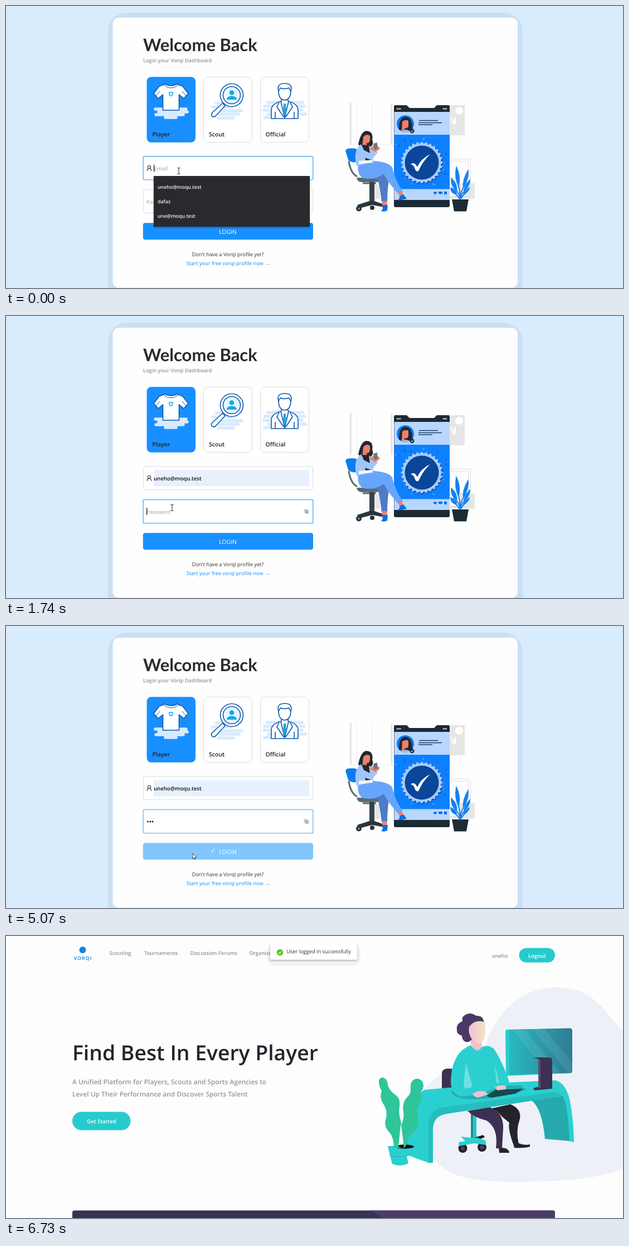
Write an HTML page that moves like this. It is 1107 px wide and 506 px high and loops after 8840 ms.

```html
<!DOCTYPE html>
<html lang="en">
<head>
<meta charset="utf-8">
<title>Login flow</title>
<style>
html, body { margin: 0; height: 100%; overflow: hidden; background: #fdfdfe; }
svg { display: block; width: 1107px; height: 506px; font-family: "Open Sans", "Noto Sans", sans-serif; text-rendering: geometricPrecision; }
.semi { font-weight: 600; }
.mid { text-anchor: middle; }
.bands { fill: none; stroke: #d8eaff; stroke-width: 5.5; stroke-linecap: round; }
.ink { fill: #fff; stroke: #0b57ad; stroke-width: 1.6; stroke-linejoin: round; }
.label { font-size: 10.5px; font-weight: 600; fill: #222; }
.box { fill: #fff; stroke: #dcdcdc; }
.focus { fill: none; stroke: #5db5ff; stroke-width: 1.2; }
.glow { fill: none; stroke: #1890ff; stroke-opacity: .2; stroke-width: 2; }
.hint { font-size: 9.3px; font-weight: 600; fill: #b4b4b4; }
.nav { font-size: 9.35px; fill: #938e98; }
.pill { fill: #27cbcd; }
.pilltext { font-size: 9.5px; fill: #fff; }
</style>
</head>
<body>
<svg viewBox="0 0 1107 506">
<defs>
  <linearGradient id="skin"><stop stop-color="#f1c3d2"/><stop offset="1" stop-color="#f3e3c4"/></linearGradient>
  <linearGradient id="glass"><stop stop-color="#28b9bd"/><stop offset="1" stop-color="#2f7993"/></linearGradient>
  <clipPath id="face"><circle cx="716.5" cy="211.5" r="15.5"/></clipPath>
  <clipPath id="screen"><path d="M903 168L1012 165.500Q1016 166 1016 170V243Q1016 246 1012 246L903 249Z"/></clipPath>
  <filter id="soft" x="-10%" y="-20%" width="120%" height="150%"><feDropShadow dx="0" dy="1.500" stdDeviation="1.500" flood-opacity=".35"/></filter>
</defs>

<g id="login">
  <rect width="1107" height="506" fill="#d9ecfe"/>
  <rect x="183" y="12" width="744" height="540" rx="34" fill="#cadff2"/>
  <rect x="191.500" y="21" width="726.500" height="484.500" rx="11" fill="#fefefe"/>
  <text x="246" y="81" font-size="31" font-weight="700" fill="#2a2b30" style="font-family:Lato,sans-serif">Welcome Back</text>
  <text x="246" y="100.500" font-size="9.200" class="semi" fill="#949199">Login your Vorqi Dashboard</text>

  <rect x="252.600" y="127.200" width="87.400" height="117.600" rx="8" fill="#188fff"/>
  <rect class="box" x="354.500" y="127.500" width="87" height="117" rx="8"/>
  <rect class="box" x="456.500" y="127.500" width="87" height="117" rx="8"/>
  <text class="label" x="262.500" y="234">Player</text>
  <text class="label" x="364" y="234">Scout</text>
  <text class="label" x="465.500" y="234">Official</text>

  <path class="bands" d="M268 185H323M274 190H325M269 195H318M286 200H305"/>
  <path class="ink" d="M285 140Q296 146 307 140L317 144L327 157L319 166L310.500 159V187H281.500V159L273 166L265 157L275 144Z"/>
  <path d="M283 142Q296 152 309 142M269 161L276 153M323 161L316 153" fill="none" stroke="#0b57ad"/>
  <path d="M293 155H299V158.500Q298 161 296 161.500Q294 161 293 158.500Z" fill="#dff6ff" stroke="#12a9e6" stroke-width="1.500"/>

  <path class="bands" d="M377 174H421M370 181H404M374 188H423M370 194H417M381 201H408"/>
  <g class="ink">
    <path d="M388.500 174.500L393 179L375.500 198Q372 200 369.500 197.500Q367.500 195 370 191.500Z"/>
    <circle cx="405" cy="160" r="20.500"/><circle cx="405" cy="160" r="15.500" fill="#e6f5ff"/>
  </g>
  <circle cx="405" cy="155.500" r="4.300" fill="#14a9e2"/>
  <path d="M396 168Q396 161.500 405 161.500Q414 161.500 414 168Z" fill="#14a9e2"/>

  <path class="bands" d="M469 173H532M464 180H535M463 187H531M471 194H538M464 200H480"/>
  <g class="ink">
    <path d="M476 202V186Q477 175 494 171V164H506V171Q523 175 524 186V202Z"/>
    <path d="M489 152Q489 168 500 169Q511 168 511 152V147H489Z"/>
    <path d="M489 153Q485 139 500 139Q515 139 511 153Q509 150 508 147Q498 150 492 147Z"/>
    <path d="M493 171L500 201L507 171M490 173L486 181L498 199M510 173L514 181L502 199M483 190V202M517 190V202" fill="none"/>
  </g>
  <path d="M498 175H502L503 190L500 197L497 190Z" fill="#14a9e2"/>

  <rect class="box" x="246.500" y="270.200" width="304" height="41.300" rx="2"/>
  <rect class="box" x="246.500" y="329.700" width="304" height="41.800" rx="2"/>
  <g id="emailFocus"><rect class="glow" x="245.500" y="269.200" width="306" height="43.300" rx="3"/><rect class="focus" x="246.500" y="270.200" width="304" height="41.300" rx="2"/></g>
  <g id="passFocus"><rect class="glow" x="245.500" y="328.700" width="306" height="43.800" rx="3"/><rect class="focus" x="246.500" y="329.700" width="304" height="41.800" rx="2"/></g>
  <rect id="filled" x="265" y="276.500" width="279" height="29" fill="#e8f0fe"/>
  <path d="M253.300 296Q253.300 291.500 257 291.500Q260.700 291.500 260.700 296" fill="none" stroke="#333" stroke-width="1.100"/>
  <circle cx="257" cy="288.800" r="2.600" fill="none" stroke="#333" stroke-width="1.100"/>
  <text id="emailHint" class="hint" x="265.500" y="294.500">Email</text>
  <text id="email" class="semi" x="265" y="294.500">uneho@moqu.test</text>
  <text id="passHint" class="hint" x="252" y="354.500">Password</text>
  <g id="dots" fill="#222"><circle cx="254.500" cy="351" r="1.500"/><circle cx="258.800" cy="351" r="1.500"/><circle cx="263" cy="351" r="1.500"/></g>
  <rect id="caret" width="1.200" height="13" fill="#111"/>
  <g fill="none" stroke="#888"><path d="M534.500 351Q539 344 543.500 351Q539 357.500 534.500 351Z"/><circle cx="539" cy="351" r="1.600"/><path d="M535.500 346.500L543 355"/></g>

  <rect id="button" x="245.800" y="389.300" width="305.200" height="30" rx="4"/>
  <path id="spinner" d="M6 0A6 6 0 0 1 0 6" fill="none" stroke="#fff"/>
  <text id="loginText" class="mid" y="408.500" font-size="10.600" font-weight="500" fill="#fff">LOGIN</text>
  <text class="mid" x="398" y="449" font-size="9.300" fill="#333">Don't have a Vorqi profile yet?</text>
  <text class="mid" x="398.500" y="465" font-size="9.300" fill="#1787f5">Start your free vorqi profile now →</text>

  <g id="art">
    <path d="M618.500 174V249M692 175V249" stroke="#e3e3e3" stroke-width="3"/>
    <path d="M629.500 174V249M657 174V249M617 249H694" stroke="#ececec"/>
    <path d="M796 178H823V232H796ZM807 318H841V346H796V341H807ZM660 320H671V346H660Z" fill="#e6e6e6"/>
    <path d="M797 274.500H833.500V341H797M797 278.500H829.500V337" fill="none" stroke="#dedede"/>
    <circle cx="813" cy="188" r="7" fill="#fff"/>
    <path d="M798 199L803 212L806 199V212" stroke="#fff" stroke-width="2" fill="none"/>
    <path d="M698 178H719L724 183H768L773 178H794Q796 178 796 181V358Q796 361 793 361H699Q696 361 696 358V181Q696 178 698 178Z" fill="#1c2a35"/>
    <path d="M696.500 190H796V348H696.500Z" fill="#b9d6ff"/>
    <rect x="696.500" y="231" width="99.500" height="97.500" fill="#0d80ff"/>
    <path d="M701 184.500H709M784 184.500H791" stroke="#fff" stroke-width="2" stroke-dasharray="2 .7"/>
    <path d="M741 205.500H775M740 209.500H782M740 213H765" stroke="#1c3c66" stroke-width="1.500"/>
    <g clip-path="url(#face)"><circle cx="716.500" cy="211.500" r="15.500" fill="#0877ea"/>
      <path d="M705 222Q705 201 715 199Q730 198 729 224Z" fill="#202833"/>
      <path d="M704 230Q708 222 715 222Q726 222 728 230Z" fill="#92bdf9"/>
      <path d="M711 207Q718 203 722 206V216Q719 221 715 219V224H710Z" fill="#ee8069"/></g>
    <circle cx="728.500" cy="224" r="4.200" fill="#172d45"/><path d="M726.500 224L728 226L731 222" stroke="#fff" fill="none"/>
    <g id="confetti" stroke-width="1.400"/>
    <path id="burstShade" fill="#0a479b" transform="translate(1 1.500)"/><path id="burst" fill="#a9cbfa"/>
    <circle cx="746" cy="281" r="30.500" fill="#0a469a"/>
    <path d="M726 284Q733 278 738 289Q744 274 761 266Q748 278 740 296Q736 298 734 293Q732 285 726 284Z" fill="#fff"/>
    <path d="M770 338.500L767 335.500Q767 332.500 770 333.500Q773 332.500 773 335.500ZM776 333H783V337H780L779 339V337H776ZM786 333H791V339L788.500 337L786 339Z" fill="#0b6be4"/>
    <path d="M800 347H830L826 368.500H804Z" fill="#1d2b34"/>
    <g id="leaves" fill="#1382f3"/>

    <path d="M610 263Q607 256 616 255.500Q631 254 632 261L636 279Q620 283 614 276Z" fill="#0b7cf2"/>
    <path d="M615 278Q618 300 630 306M640 318H664" fill="none" stroke="#596a73" stroke-width="3"/>
    <path d="M629 308H676V312Q672 316 662 316H637Q630 315 629 308Z" fill="#596a73"/>
    <path d="M652 316H661V354H652Z" fill="#35434c"/>
    <path d="M630 357L652 350H661L684 358V362L657 357L634 363Z" fill="#29363e"/>
    <circle cx="633" cy="363.500" r="5" fill="#26323a"/><circle cx="633" cy="363.500" r="2" fill="#788790"/><circle cx="657" cy="362" r="4" fill="#26323a"/>
    <path d="M655 292L690 296Q684 322 684 352H674Q671 325 667 311L645 309Z" fill="#4f7cc4"/>
    <path d="M632 283L660 278Q688 280 693 290Q698 312 712 333L704 337Q684 315 678 301Q661 313 641 309Q629 303 632 283Z" fill="#67a5fc"/>
    <path d="M674 350H683L684 360H676ZM703 335L710 332L714 342L707 343Z" fill="#ee8069"/>
    <path d="M673 357L685 357L684 367Q679 370 673 368Q679 363 673 357ZM706 341L713 338L719 346L704 349Q702 348 706 345Z" fill="#0b70e4"/>
    <path d="M632 248Q637 224 647 224Q660 225 657 240Q661 249 653 253Q640 259 632 248Z" fill="#20282f"/>
    <path d="M641 235Q647 228 653 233Q654 241 651 245Q648 247 647 245L648 253H639Z" fill="#ee8069"/>
    <path d="M638 249L653 250L657 281H635Z" fill="#20282f"/>
    <path d="M637 248Q645 260 645 283L629 287Q622 259 637 248ZM651 250Q659 256 659 281L655 282ZM635 255L653 264L661 257L667 263L656 276Q642 273 632 265Z" fill="#a1c6fa"/>
    <path d="M633 278L657 276V281L633 284Z" fill="#f8f8f8"/>
    <path d="M653 257Q655 250 663 250L671 254Q669 260 662 262Z" fill="#ee8069"/>
    <path d="M659 247L666 245L667 256L661 258Z" fill="#697681"/>
  </g>

  <g id="popup">
    <rect x="265" y="305" width="280" height="91" fill="#292a2d" filter="url(#soft)"/>
    <rect id="hover" x="265" y="311" width="280" height="26" fill="#404145"/>
    <g font-size="8.800" class="semi" fill="#f4f4f4">
      <text x="272" y="327.500">uneho@moqu.test</text><text x="272" y="353.500">dafas</text><text x="272" y="380">une@moqu.test</text>
    </g>
  </g>
</g>

<g id="home">
  <rect width="1107" height="506" fill="#fdfdfe"/>
  <circle cx="137.500" cy="25" r="6" fill="#1683e2"/>
  <text class="mid semi" x="138" y="43" font-size="9" letter-spacing="1" fill="#1683e2">VORQI</text>
  <g class="nav semi">
    <text x="185.500" y="33.500">Scouting</text><text x="248" y="33.500">Tournaments</text>
    <text x="330.500" y="33.500">Discussion Forums</text><text x="436.500" y="33.500">Organizer</text>
    <text id="account" y="38.500"/>
  </g>
  <rect id="signPill" class="pill" y="21.500" height="26" rx="13"/>
  <text id="signText" class="mid semi pilltext" y="38.500"/>
  <text x="119" y="223" font-size="37.300" class="semi" fill="#25232b">Find Best In Every Player</text>
  <g font-size="11.900" class="semi" fill="#98929e">
    <text x="119" y="266">A Unified Platform for Players, Scouts and Sports Agencies to</text>
    <text x="119" y="288">Level Up Their Performance and Discover Sports Talent</text>
  </g>
  <rect class="pill" x="119" y="315.500" width="104.500" height="33" rx="16.500"/>
  <text class="mid semi pilltext" x="171.500" y="336">Get Started</text>

  <path d="M1107 168C1078 150 1064 92 988 92C928 92 884 132 862 190C846 230 790 232 757 268C720 305 730 355 765 398C790 425 815 441 910 441C1000 441 1060 436 1107 418Z" fill="#eef0f8"/>
  <path d="M782 246Q783 238 792 238H800V278H782Z" fill="#3b3152"/>
  <path d="M834 312H844V364H834Z" fill="#27c6c8"/><path d="M834 318H838V362H834Z" fill="#1b8f93"/>
  <path d="M840 362L856 357L859 361L846 366Z" fill="#17171b"/>
  <circle cx="819.500" cy="381" r="8" fill="#222128"/><circle cx="854" cy="379" r="8" fill="#222128"/>
  <circle cx="819.500" cy="381" r="3.500" fill="#4a3f62"/><circle cx="854" cy="379" r="3.500" fill="#4a3f62"/>
  <path d="M816 360L834 362H846L861 367V375L840 372L813 377L812 370L824 368Z" fill="#2ad0d0"/>
  <path d="M868 310L905 302Q925 310 922 328Q914 350 920 373L911 376Q900 346 903 335Q890 325 880 314ZM884 379L897 381Q903 385 903 389H885ZM911 376L920 372Q930 376 940 374V378Q930 381 912 380Z" fill="#24232a"/>
  <path d="M828 314L868 307Q893 317 892 345L890 381H879Q884 345 862 331Q840 326 828 314Z" fill="#3c3153"/>
  <path d="M943 295L1000 287Q1011 315 1013 368L967 364Q962 310 943 295Z" fill="#24a9ac"/>
  <path d="M712 388Q716 325 728 300Q738 282 751 276L897 263L985 259Q1003 262 1011 292Q1018 325 1019 370L1011 368Q1008 305 1000 287L790 319Q767 323 766 345V407H758L712 390Z" fill="#2ad0d0"/>
  <path d="M758 407V338Q758 312 785 307L985 280L1000 287L790 319Q767 323 766 345V407Z" fill="#25bdbf"/>
  <path d="M797 279L842 270L924 268L934 276Q885 292 838 293Q806 293 797 279Z" fill="#24aeb0"/>

  <path d="M896 171Q896 168 900 168L1012 165.500Q1016 166 1016 170V242Q1016 246 1012 246L897 251Z" fill="#29cccf"/>
  <g clip-path="url(#screen)"><path d="M903 160H1020V252H903Z" fill="url(#glass)"/>
    <path d="M913 160L988 252M950 160L1025 252" stroke="#fff" stroke-opacity=".08" stroke-width="17"/></g>
  <path d="M946 218H975Q980 218 980 225V274L948 277L946 273L957 270V224Q956 220 946 218Z" fill="#3c3153"/>
  <path d="M957 222V273" stroke="#594d70" stroke-width="4"/>

  <path d="M834 194L833 177L853 182L854 205Q846 212 838 203Z" fill="#efc1cd"/>
  <path d="M834 196Q846 213 854 199Q866 194 876 203Q892 228 903 262L883 271Q850 286 820 288Q798 286 798 260Q800 208 834 196Z" fill="#2bcfd0"/>
  <path d="M825 227L837 270Q826 277 821 270ZM877 231L885 263L880 264Z" fill="#70dfdf"/>
  <path d="M862 287L878 276L928 274L914 283L870 290Z" fill="#17474e"/>
  <path d="M837 284Q845 276 860 279L865 284L850 289Q842 291 837 284ZM877 272Q885 266 897 269L897 275L882 277Z" fill="#f0c2d1"/>
  <path d="M831 160Q838 149 859 152Q862 178 856 187Q850 195 843 190Q831 185 831 160Z" fill="url(#skin)"/>
  <path d="M857 154Q857 143 843 143Q834 136 825 141Q817 144 819 153Q807 158 809 168Q808 176 818 179Q819 192 830 190L836 186Q829 174 831 163Q841 149 857 154Z" fill="#4a3964"/>

  <path d="M685 377L727 375L725 393L719 395L722 408Q707 415 693 409L689 394Z" fill="#2ad0d0"/>
  <path d="M688 394Q706 398 725 393" stroke="#22aeb1" fill="none"/>
  <ellipse cx="715" cy="378" rx="17" ry="3.700" fill="#111"/>
  <path d="M669 262Q669 253 677 254Q685 257 685 268Q690 280 700 286Q708 292 706 306Q704 320 708 330L714 380H696Q696 360 686 350Q677 340 682 326Q685 312 676 300Q670 290 674 278Q669 270 669 262ZM749 268Q748 257 738 256Q725 257 726 272Q727 283 719 290Q710 300 713 316Q715 330 708 340L704 378L714 381Q722 372 722 362Q730 352 738 345Q742 335 738 322Q736 310 744 298Q750 290 744 280Q749 275 749 268Z" fill="#2ec59b"/>
  <path d="M119 506V496.500Q119 492.500 123 492.500H981Q985 492.500 985 496.500V506Z" fill="#3b3152"/>
  <path d="M652 492.500H981Q985 492.500 985 496.500V506H674Q666 497 652 492.500Z" fill="#4a3c66"/>

  <g id="toast">
    <rect x="468" y="14" width="168" height="40" rx="15" fill="#000" fill-opacity=".045"/>
    <rect x="474" y="12" width="156" height="30.500" rx="2" fill="#fff" filter="url(#soft)"/>
    <circle cx="491.500" cy="29.500" r="5.700" fill="#52c41a"/><path d="M489 29.500L491 31.800L494.200 27.500" fill="none" stroke="#fff" stroke-width="1.200"/>
    <text x="503" y="31" font-size="9.300" fill="#333">User logged in successfully</text>
  </g>
</g>

<g id="beam"><path d="M-2.500 -5.500H-.7L0 -5L.7 -5.500H2.500M0 -5V5M-2.500 5.500H-.7L0 5L.7 5.500H2.500" fill="none" stroke="#222"/></g>
<path id="hand" d="M-2 -5Q-2 -6.500 -.8 -6.500Q.4 -6.500 .4 -5V-1L4 0Q5 .5 5 2L4 6.500H-1.500L-5 1.500Q-5 0 -3.500 .3L-2 1.500Z" fill="#fff" stroke="#222" stroke-width=".9"/>
<path id="arrow" d="M0 0V9.500L2.200 7.600L3.700 11L5 10.400L3.500 7.200H6.500Z" fill="#fff" stroke="#222" stroke-width=".8"/>
</svg>

<script>
const LOOP = 8840;
const ticks = [0, 120, 270, 390, 660, 810, 960, 1100, 1220, 1340, 1460, 1610, 1740, 2010, 2140, 2400, 2940, 3190,
  3500, 3650, 3770, 4320, 4440, 4560, 4680, 4830, 4950, 5080, 5200, 5350, 5480, 5600, 5880, 6000, 6150, 6300, 6580, 6730];
const pointer = [
  [0, 310, 296, "beam"], [120, 310, 302, "beam"], [270, 308, 318, "arrow"], [390, 307, 321, "arrow"], [960, 304, 332, "beam"],
  [1100, 301, 337, "beam"], [1220, 299, 342, "beam"], [1340, 298, 344, "beam"], [4320, 304, 363, "beam"],
  [4440, 321, 396, "hand"], [4560, 332, 410, "hand"], [4680, 337, 414, "hand"], [4950, 335, 408, "arrow"],
  [5880, 440, 442, "arrow"], [6000, 613, 460, "arrow"], [6150, 680, 455, "arrow"], [6300, 853, 466, "arrow"],
  [6580, 988, 496, "arrow"], [6730, 0, 0, ""]];
const typed = [[0, 0], [2010, 1], [2400, 2], [3190, 1], [3650, 2], [3770, 3]];

const $ = id => document.getElementById(id);
const set = (id, attrs) => { for (const k in attrs) $(id).setAttribute(k, attrs[k]); };
const show = (id, on) => set(id, { visibility: on ? "visible" : "hidden" });
const ramp = (t, from, to) => Math.min(1, Math.max(0, (t - from) / (to - from)));
const last = (rows, t) => rows.filter(r => r[0] <= t).pop();
const random = n => { const v = Math.sin(n * 12.9898) * 43758.5453; return v - Math.floor(v); };

function buildArt() {
  const points = Array.from({ length: 56 }, (_, i) => {
    const a = i * Math.PI / 28, r = i % 2 ? 34 : 38;
    return `${746 + r * Math.cos(a)} ${281 + r * Math.sin(a)}`;
  });
  for (const id of ["burst", "burstShade"]) set(id, { d: `M${points.join("L")}Z` });
  let bits = "";
  for (let i = 1; i < 42; i++) {
    const x = 699 + 92 * random(i), y = 234 + 90 * random(i + 70);
    bits += `<path d="M${x} ${y}l${4 * random(i + 9) - 2} 3" stroke="${i % 2 ? "#62aeff" : "#0b55b4"}"/>`;
  }
  $("confetti").innerHTML = bits;
  // Each leaf is a stem curving up from the pot with a blade along its upper part.
  const tips = [[808, 289], [799, 309], [798, 326], [829, 295], [832, 312], [831, 326]];
  $("leaves").innerHTML = tips.map(([x, y]) => {
    const bx = x + (815 - x) * 0.6, by = y + (347 - y) * 0.6, w = 6;
    const mx = (x + bx) / 2, my = (y + by) / 2;
    return `<path d="M815 348Q815 ${by + 8} ${bx} ${by}" fill="none" stroke="#1382f3" stroke-width="2"/>
      <path d="M${bx} ${by}Q${mx - w} ${my + 2} ${x} ${y}Q${mx + w} ${my - 2} ${bx} ${by}Z" stroke="#1382f3" stroke-width="1.5"/>`;
  }).join("");
}

function drawLogin(t) {
  const filled = t >= 390, chosen = t >= 810;
  const dots = last(typed, t)[1];
  const loading = t >= 4950;

  set("emailFocus", { opacity: 1 - ramp(t, 1340, 1740) });
  set("passFocus", { opacity: ramp(t, 1340, 1740) * (1 - ramp(t, 4830, 5350)) });
  show("emailHint", !filled);
  show("filled", filled);
  show("email", filled);
  set("email", { "font-size": chosen ? 9.6 : 9, fill: t < 660 ? "#555" : "#111" });
  show("passHint", !dots);
  [...$("dots").children].forEach((dot, i) => dot.setAttribute("visibility", i < dots ? "visible" : "hidden"));

  const inPassword = t >= 1460;
  const caretOn = t < 390 || (t >= 810 && t < 2940) || (t >= 3500 && t < 4320);
  show("caret", caretOn);
  set("caret", { x: inPassword ? 252 + 4.3 * dots : chosen ? 349.5 : 265, y: inPassword ? 344 : 284.5 });

  const fade = ramp(t, 720, 960);
  show("popup", t < 1100);
  show("hover", t >= 270 && t < 810);
  set("popup", { opacity: 1 - 0.87 * fade,
    transform: `translate(${405 + fade} ${350.5 + 2 * fade}) scale(${1 - 0.034 * fade}) translate(-405 -350.5)` });

  set("button", { fill: t >= 4440 ? "#40a9ff" : "#1890ff", opacity: loading ? 0.65 : 1 });
  show("spinner", loading);
  set("spinner", { transform: `translate(376 406) rotate(${(t - 5480) * 0.36})` });
  set("loginText", { x: 398 + 9 * ramp(t, 4950, 5200) });
}

function drawHome(t) {
  const signedIn = t >= 5880;
  $("account").textContent = signedIn ? "uneho" : "Login";
  set("account", { x: signedIn ? 871.5 : 871 });
  set("signPill", { x: signedIn ? 920.5 : 918, width: signedIn ? 64.5 : 67 });
  $("signText").textContent = signedIn ? "Logout" : "Sign Up";
  set("signText", { x: signedIn ? 952.8 : 951.7 });
  const slide = ramp(t, 5800, 6000);
  set("toast", { opacity: slide, transform: `translate(0 ${-14 * (1 - slide)})` });
}

function draw(now) {
  const t = ticks.filter(v => v <= now % LOOP).pop();
  const home = t >= 5600;
  $("login").style.display = home ? "none" : "";
  $("home").style.display = home ? "" : "none";
  home ? drawHome(t) : drawLogin(t);
  const [, x, y, kind] = last(pointer, t);
  for (const id of ["beam", "hand", "arrow"]) {
    show(id, id === kind);
    set(id, { transform: `translate(${x} ${y})` });
  }
}

buildArt();
draw(0);
let start;
requestAnimationFrame(function tick(now) {
  start ??= now;
  draw(now - start);
  requestAnimationFrame(tick);
});
</script>
</body>
</html>
```
